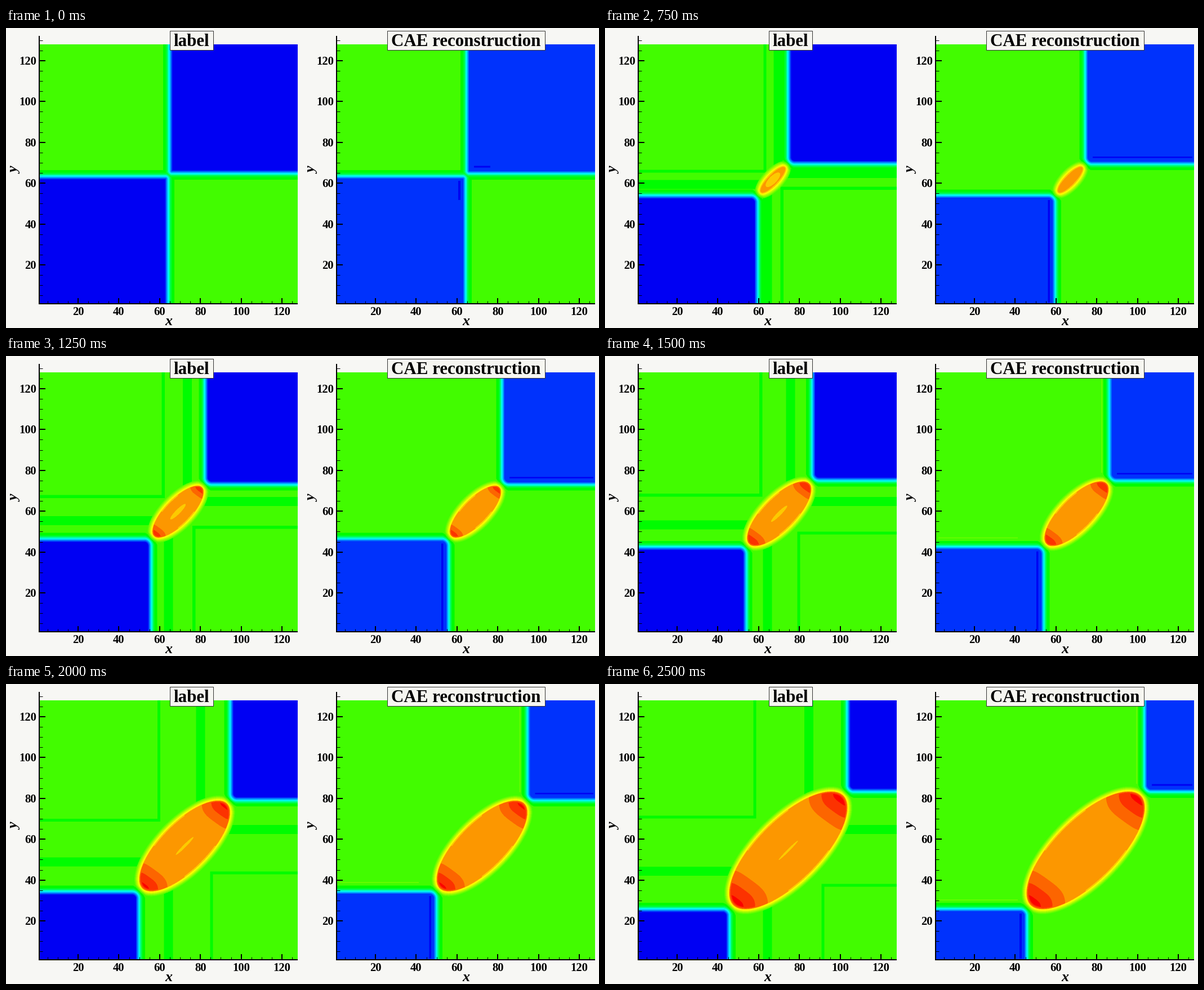
Animation, 1053 px wide and 532 px high, one loop 2.75 s. Source, as a matplotlib script:

```python
import numpy as np
import matplotlib.pyplot as plt
from matplotlib.animation import FuncAnimation
from matplotlib.patches import Rectangle

W, H, DPI = 1053, 532, 100
PT = 72 / DPI
FRAMES, STEP = 11, 250
LEFT, TOP, PW, PH = 59, 29, 459, 460
SHIFT = 528
UNIT = 3.62          # pixels per axis unit
BASE = 11.5          # level of the undisturbed green field
SS = 2               # supersampling

# 21-step rainbow: blue, cyan, green, yellow, red
ramp = np.linspace(0, 4, 21)
PALETTE = 252 * np.clip(np.stack([ramp - 2, 2 - abs(ramp - 2), 2 - ramp], 1), 0, 1)
PALETTE[0] = 0, 0, 243
PALETTE[11] = 66, 252, 0

X, Y = np.meshgrid(LEFT + (np.arange(PW * SS) + 0.5) / SS,
                   TOP + (np.arange(PH * SS) + 0.5) / SS)


class State:
    """Positions of all fronts in one frame."""

    def __init__(self, i):
        self.i = i
        s = self.s = (i / (FRAMES - 1)) ** 1.15
        self.tr_x, self.tr_y = 290 + 140 * s, 258 - 67 * s
        self.bl_x, self.bl_y = 288 - 67 * s, 263 + 136 * s
        self.back, self.front = 290 - 24 * s, 290 + 97 * s
        self.wake = 289 + 73 * s
        self.round = min(5 + 3 * i, 12)
        self.grown = min(1, i / 2)
        self.tip = 75 * (s - 0.1)
        pad = 10 * s ** 0.4 - 4
        self.cx = (self.bl_x + self.tr_x) / 2
        self.cy = (self.tr_y + self.bl_y) / 2
        self.hw = (self.tr_x - self.bl_x) / 2 + pad
        self.hh = (self.bl_y - self.tr_y) / 2 + pad


def corner_depth(dx, dy, r):
    """Signed depth inside a quarter plane with a rounded corner."""
    out = np.hypot(np.maximum(r - dx, 0), np.maximum(r - dy, 0))
    return r - out + np.maximum(np.minimum(dx, dy) - r, 0)


def blue_level(st):
    depth = np.maximum(
        corner_depth(X - st.tr_x, st.tr_y - Y, st.round),
        corner_depth(st.bl_x - X, Y - st.bl_y, st.round))
    return np.interp(depth, [-13, -5, 0, 6], [BASE, 9.7, 5.2, 0.4])


def lens_level(st):
    """Level of the growing ellipse and signed depth inside it."""
    if st.i == 0:
        return np.full(X.shape, BASE), np.full(X.shape, -99.0)
    p, q = (X - st.cx) / st.hw, (st.cy - Y) / st.hh
    u, w = (p + q) / np.sqrt(2), (q - p) / np.sqrt(2)
    a, b = 1.3, 0.557
    k0 = np.hypot(u / a, w / b)
    k1 = np.hypot(u / a**2, w / b**2) + 1e-6
    depth = (st.hw + st.hh) / 2 * k0 * (1 - k0) / k1
    v = np.interp(depth, [-7, -3, 3, 8.5], [BASE, 12, 15, 17.4])
    v = np.minimum(v, BASE + 2.6 * st.i)
    if st.tip > 15:
        v = np.maximum(v, tip_level(st, depth))
    return v, depth


def tip_level(st, depth):
    """Hot nested wedges at both ends of the ellipse."""
    dx = abs(X - st.cx) - 0.95 * st.hw
    dy = abs(Y - st.cy) - 0.95 * st.hh
    r = np.hypot(dx, dy) * (1 + 0.04 * np.sin(5 * np.arctan2(dy, dx)))
    hot = np.interp(r / st.tip, [0.37, 0.67, 1, 1.5], [20, 19, 18, 17.3])
    hot = np.minimum(hot, np.interp(depth, [6, 8, 11], [18, 19, 20.4]))
    ends = (X - st.cx) * (st.cy - Y) > 0
    return np.where(ends & (depth > 6), hot, 0)


def add_streak(v, st):
    """Slightly cooler sliver along the middle of the ellipse."""
    if st.i < 3:
        return
    along = ((X - st.cx) + (st.cy - Y)) / np.sqrt(2)
    across = ((X - st.cx) - (st.cy - Y)) / np.sqrt(2)
    v[(along / (14 + st.i)) ** 2 + (across * st.i / 20) ** 2 < 1] = 16.5


def add_bands(v, st, depth):
    """Weak waves left behind in the green field."""
    thin, wide = 2.6 * st.grown, 8 * st.grown
    back, front, wake, cx, cy = st.back, st.front, st.wake, st.cx, st.cy
    m = (abs(X - back) < thin) & (Y < back - 30 + thin)
    m |= (abs(Y - back + 30) < thin) & (X < back + thin)
    m |= (abs(X - front) < thin) & (Y > front - 30 - thin)
    m |= (abs(Y - front + 30) < thin) & (X > front - thin)
    m |= (abs(X - wake) < wide) & (Y < cy) & (X > cx - 20)
    m |= (abs(Y - wake + 30) < wide) & (X < cx) & (Y > cy - 20)
    m |= (abs(X - 288.5) < wide) & (Y > cy) & (X < cx + 20)
    m |= (abs(Y - 258) < wide) & (X > cx) & (Y < cy + 20)
    v[m & (v > 11) & (v < 12.2) & (depth < -3)] = 10.5


def hline(y, x0, x1, half):
    return (abs(Y - y) < half) & (X > x0) & (X < x1)


def vline(x, y0, y1, half):
    return (abs(X - x) < half) & (Y > y0) & (Y < y1)


def add_residue(v, st):
    """Stray lines of the reconstructed field."""
    reach = 42 + 200 * st.i
    dark = hline(st.tr_y - 12, st.tr_x + 13, min(515, st.tr_x + reach), 1.3)
    dark |= vline(st.bl_x - 11, st.bl_y + 8, min(487, st.bl_y + reach), 1.8)
    v[dark] = 0.5
    if st.s > 0.5:
        pale = hline(st.bl_y - 16, 64, 205, 1)
        pale |= vline(st.tr_x - 14, 34, st.tr_y - 14, 1)
        v[pale] = 12.5


def colour(v):
    rgb = PALETTE[np.clip(v, 0, 20).astype(int)]
    rgb = rgb.reshape(PH, SS, PW, SS, 3).mean(axis=(1, 3))
    return np.round(rgb).astype(np.uint8)


def panels(i):
    st = State(i)
    warm, depth = lens_level(st)
    label = blue_level(st) + warm - BASE
    recon = np.maximum(label, 1.5)
    add_streak(label, st)
    add_bands(label, st, depth)
    add_residue(recon, st)
    return colour(label), colour(recon)


fig = plt.figure(figsize=(W / DPI, H / DPI), dpi=DPI, facecolor="#f7f7f4")
ax = fig.add_axes([0, 0, 1, 1])
ax.axis("off")


def line(xs, ys, width):
    ax.plot(xs, ys, color="black", lw=width * PT, solid_capstyle="butt", zorder=3)


def text(x, y, string, size, ha="center", **kw):
    ax.text(x, y, string, fontsize=size * PT, family="Liberation Serif",
            weight="bold", ha=ha, va="baseline", zorder=5, **kw)


def frame_panel(off, title, x0, x1):
    left, base = LEFT + off, TOP + PH
    line([left, left], [14, base + 1], 2)
    line([left, left + PW], [base, base], 2)
    for n in range(5, 131, 5):
        major = n % 20 == 0
        size, width = (10, 2) if major else (5, 1)
        px, py = 55.6 + off + n * UNIT, 492.4 - n * UNIT
        line([left, left + size + 1], [py, py], width)
        if n < 128:
            line([px, px], [base, base - size], width)
        if major:
            text(px, 509, str(n), 20.6)
            text(left - 5, py + 7, str(n), 20.6, ha="right")
    text(289 + off, 527, "x", 26, style="italic")
    text(23 + off, 252, "y", 26, style="italic", rotation=90,
         rotation_mode="anchor")
    ax.add_patch(Rectangle((x0, 5), x1 - x0, 34, fc="#f6f6f1", ec="#333333",
                           lw=PT, zorder=4))
    text((x0 + x1) / 2, 32, title, 31)


def picture(off):
    x0 = LEFT + off
    return ax.imshow(np.zeros((PH, PW, 3), np.uint8), interpolation="nearest",
                     extent=(x0, x0 + PW, TOP + PH, TOP), aspect="auto", zorder=1)


images = [picture(0), picture(SHIFT)]
frame_panel(0, "label", 290.5, 367.5)
frame_panel(SHIFT, "CAE reconstruction", 676.5, 956.5)
ax.set_xlim(0, W)
ax.set_ylim(H, 0)


def update(i):
    for image, data in zip(images, panels(i)):
        image.set_data(data)
    return images


anim = FuncAnimation(fig, update, frames=FRAMES, interval=STEP,
                     init_func=lambda: update(0), repeat=True, repeat_delay=0)
plt.show()
```
